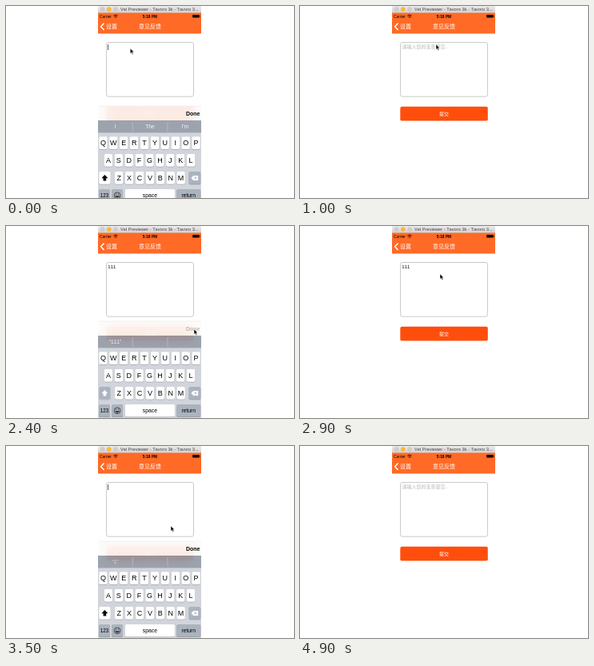
Animation, 360 px wide and 240 px high, one loop 5 s. Source, as an HTML page:

```html
<!DOCTYPE html>
<html lang="zh-CN">
<head>
<meta charset="utf-8">
<title>意见反馈</title>
<style>
html, body { margin: 0; width: 100%; height: 100%; overflow: hidden; background: #fff; }
#stage { position: relative; width: 360px; height: 240px; overflow: hidden; font-kerning: none; }
#stage, text { font-family: "Liberation Sans", "Noto Sans CJK SC", "Noto Sans CJK", sans-serif; }
svg { position: absolute; left: 0; top: 0; overflow: visible; }
.mid { text-anchor: middle; }
.bold { font-weight: bold; }

/* Screen changes every 100 ms: 2% of the loop */
.hint, .field, .ones, #kb, .done, .shift, .idle, .quote, #mouse { animation: 5s step-end infinite; }
.hint { animation-name: hint; }
.field { animation-name: caret; }
.ones { animation-name: ones; }
#kb { animation-name: slide; }
.done { animation-name: press; }
.shift { animation-name: typed; }
.idle { animation-name: idle; }
.quote { animation-name: quote; }
#mouse { animation-name: mouse; }

.field, .quote { position: absolute; white-space: nowrap; }
.field { left: 127.3px; top: 48px; height: 7px; font-size: 6px; line-height: 7.4px; border-right: .8px solid #46557c; }
.ones { display: inline-block; overflow: hidden; vertical-align: top; }
.quote { left: 115px; top: 137.5px; width: 43px; font-size: 6.7px; line-height: 14px; text-align: center; color: #fff; }
.quote .ones { min-width: 1ch; }
#kb { position: absolute; left: 0; top: 0; width: 360px; height: 240px; }
.glass { position: absolute; left: 115px; width: 129px; backdrop-filter: blur(7px); }
.bar { top: 119px; height: 18.4px; background: rgba(252, 252, 251, .9); }
.words { top: 137.4px; height: 15.2px; background: rgba(143, 151, 163, .88); }

@keyframes hint { 0% { opacity: 0 } 12% { opacity: 1 } 22% { opacity: 0 } 80%, 100% { opacity: 1 } }
@keyframes caret {
  0%, 22%, 62% { border-color: #46557c }
  12%, 44%, 80%, 100% { border-color: transparent }
}
@keyframes ones {
  0%, 68%, 100% { width: 0 }
  34%, 66% { width: 1ch }
  36%, 64% { width: 2ch }
  38% { width: 3ch }
}
@keyframes typed { 0%, 68%, 100% { opacity: 0 } 34% { opacity: 1 } }
@keyframes idle { 0%, 72%, 100% { opacity: 1 } 34% { opacity: 0 } }
@keyframes quote { 0%, 72%, 100% { opacity: 0 } 34% { opacity: .85 } 68% { opacity: .6 } }
@keyframes press { 0%, 14%, 50%, 82%, 100% { opacity: 1 } 12%, 46%, 80% { opacity: .25 } }
@keyframes slide {
  0% { transform: translateY(6px) }
  2% { transform: translateY(1px) }
  4%, 30%, 48%, 68% { transform: none }
  12%, 80% { transform: translateY(9px) }
  14%, 52%, 82% { transform: translateY(72px) }
  16%, 54% { transform: translateY(113px) }
  18%, 22%, 56%, 84%, 100% { transform: translateY(122px) }
  24%, 62% { transform: translateY(60px) }
  26%, 64% { transform: translateY(13px) }
  28%, 66% { transform: translateY(2px) }
  50% { transform: translateY(15px) }
}
@keyframes mouse {
  0% { transform: translate(155.3px, 53px) }
  4% { transform: translate(155.3px, 53px); animation-timing-function: steps(3) }
  10% { transform: translate(234px, 129px) }
  14% { transform: translate(234px, 129px); animation-timing-function: steps(3) }
  20% { transform: translate(170px, 48px) }
  22% { transform: translate(170px, 48px); animation-timing-function: steps(4) }
  30% { transform: translate(172.2px, 62px) }
  38% { transform: translate(172.2px, 62px); animation-timing-function: steps(4) }
  46% { transform: translate(235px, 129px) }
  50% { transform: translate(235px, 129px); animation-timing-function: steps(4) }
  58% { transform: translate(175px, 60px) }
  62% { transform: translate(175px, 60px); animation-timing-function: steps(4) }
  70% { transform: translate(206px, 100px) }
  74% { transform: translate(206px, 100px); animation-timing-function: steps(2) }
  78% { transform: translate(235px, 129px) }
  88% { transform: translate(235px, 129px); opacity: 1; animation-timing-function: steps(4) }
  96% { transform: translate(235px, 20px); opacity: 1 }
  98%, 100% { transform: translate(235px, 20px); opacity: 0 }
}
</style>
</head>
<body>
<div id="stage">
  <svg width="360" height="240">
    <defs>
      <linearGradient id="chrome" x2="0" y2="1">
        <stop stop-color="#ebe9eb"/><stop offset="1" stop-color="#d3d1d3"/>
      </linearGradient>
    </defs>
    <rect x="115" width="129" height="9" fill="url(#chrome)"/>
    <g stroke-width=".4">
      <circle cx="120.6" cy="4" r="2.5" fill="#d0ced0" stroke="#b9b7b9"/>
      <circle cx="128.8" cy="4" r="2.5" fill="#fdbd2e" stroke="#dfa023"/>
      <circle cx="137" cy="4" r="2.5" fill="#d0ced0" stroke="#b9b7b9"/>
    </g>
    <text x="143" y="6.2" font-size="5.7" fill="#444">Vel Previewer - Tavoro 3k - Tavoro 3...</text>

    <rect x="115" y="8.5" width="129" height="26" fill="#ff6a26"/>
    <text x="117" y="14.6" font-size="4.9">Carrier</text>
    <path d="M134.3 12.2q2.7-2.3 5.4 0M135.5 13.4q1.5-1.2 3 0" fill="none" stroke="#000" stroke-width=".8"/>
    <circle cx="137" cy="14.5" r=".6"/>
    <text class="mid bold" x="180" y="14.6" font-size="4.85">5:18 PM</text>
    <rect x="233.2" y="11" width="8.4" height="3.6" rx=".6"/>
    <rect x="241.9" y="12.2" width=".7" height="1.3"/>
    <path d="M122.6 21.6l-4 4.2 4 4.2" fill="none" stroke="#fff" stroke-width="1.4"/>
    <g fill="#fff" font-size="7">
      <text x="125" y="28">设置</text>
      <text class="mid" x="180" y="27.8">意见反馈</text>
    </g>

    <rect x="125.5" y="45.5" width="109" height="67.7" rx="2.5" fill="#fff" stroke="#bababa" stroke-width=".75"/>
    <text class="hint" x="127.4" y="53.4" font-size="6" fill="#b5b5b5">请输入您的宝贵意见...</text>
    <rect x="125.3" y="125.8" width="109.5" height="17.8" rx="2.2" fill="#ff4e0c"/>
    <text class="mid" x="180" y="137" font-size="6" fill="#fff">提交</text>
  </svg>
  <div class="field"><span class="ones">111</span></div>

  <div id="kb">
    <div class="glass bar"></div>
    <div class="glass words"></div>
    <svg width="360" height="240">
      <path d="M115 119h129" stroke="#ddd" stroke-width=".4"/>
      <text class="done bold" x="225" y="130.8" font-size="6.9">Done</text>
      <rect x="115" y="152.4" width="129" height="90" fill="#d1d5db"/>
      <path d="M158.3 139v12M202 139v12" stroke="#c3c8ce" stroke-width=".6"/>
      <g class="idle mid" font-size="6.7" fill="#f4f5f6">
        <text x="136.5" y="147">I</text>
        <text x="180" y="147">The</text>
        <text x="223.8" y="147">I'm</text>
      </g>
      <g id="keys"></g>
      <path d="M123.4 205l4 4.2h-2.2v3.4h-3.6v-3.4h-2.2z"/>
      <g class="shift">
        <rect x="116.2" y="201" width="14.5" height="15.7" rx="1.7" fill="#abb3be"/>
        <path d="M123.4 205l4 4.2h-2.2v3.4h-3.6v-3.4h-2.2z" fill="#fff"/>
      </g>
      <path d="M231.4 208.9l2.9-3h5.9v6h-5.9z" fill="#fff"/>
      <path d="M235.4 207.5l2.8 2.8m0-2.8l-2.8 2.8" stroke="#8b939f" stroke-width=".7"/>
      <g fill="none" stroke="#333" stroke-width=".8">
        <circle cx="139.1" cy="230.8" r="3.9"/>
        <path d="M136.7 231.7q2.4 3 4.8 0z" fill="#333"/>
        <path d="M137.7 228.6v1.4M140.5 228.6v1.4"/>
      </g>
    </svg>
    <div class="quote">“<span class="ones">111</span>”</div>
  </div>

  <svg width="360" height="240">
    <path id="mouse" d="M0 0v6.4l1.5-1.3 1.1 2.4 1.2-.5-1.1-2.4h2z" stroke="#fff" stroke-width=".5"/>
  </svg>
</div>
<script>
const keys = document.getElementById("keys");
const unit = 129 / 320;

function add(tag, attrs, label = "") {
  const el = document.createElementNS(keys.namespaceURI, tag);
  for (const name in attrs) el.setAttribute(name, attrs[name]);
  el.textContent = label;
  keys.append(el);
}

// x and w are in points of a 320-point wide screen
function key(x, row, w, label, size = 9, fill = "#fff") {
  const left = 115 + x * unit, top = 157.2 + row * 21.9, width = w * unit;
  const box = { x: left, width, height: 15.7, rx: 1.7 };
  add("rect", { ...box, y: top + 0.5, fill: "#8b8f95" });
  add("rect", { ...box, y: top, fill });
  add("text", { x: left + width / 2, y: top + 7.6 + size * 0.36, "font-size": size, class: "mid" }, label);
}

[["QWERTYUIOP", 3], ["ASDFGHJKL", 19], ["ZXCVBNM", 52]].forEach(([row, x], r) =>
  [...row].forEach((c, i) => key(x + i * 32, r, 26, c)));

const dark = "#abb3be";
key(3, 2, 36, "");
key(282, 2, 36, "", 6, dark);
key(3, 3, 34, "123", 6.4, dark);
key(43, 3, 34, "", 6, dark);
key(84, 3, 154, "space", 6.8);
key(244, 3, 74, "return", 6.8, dark);
</script>
</body>
</html>
```
